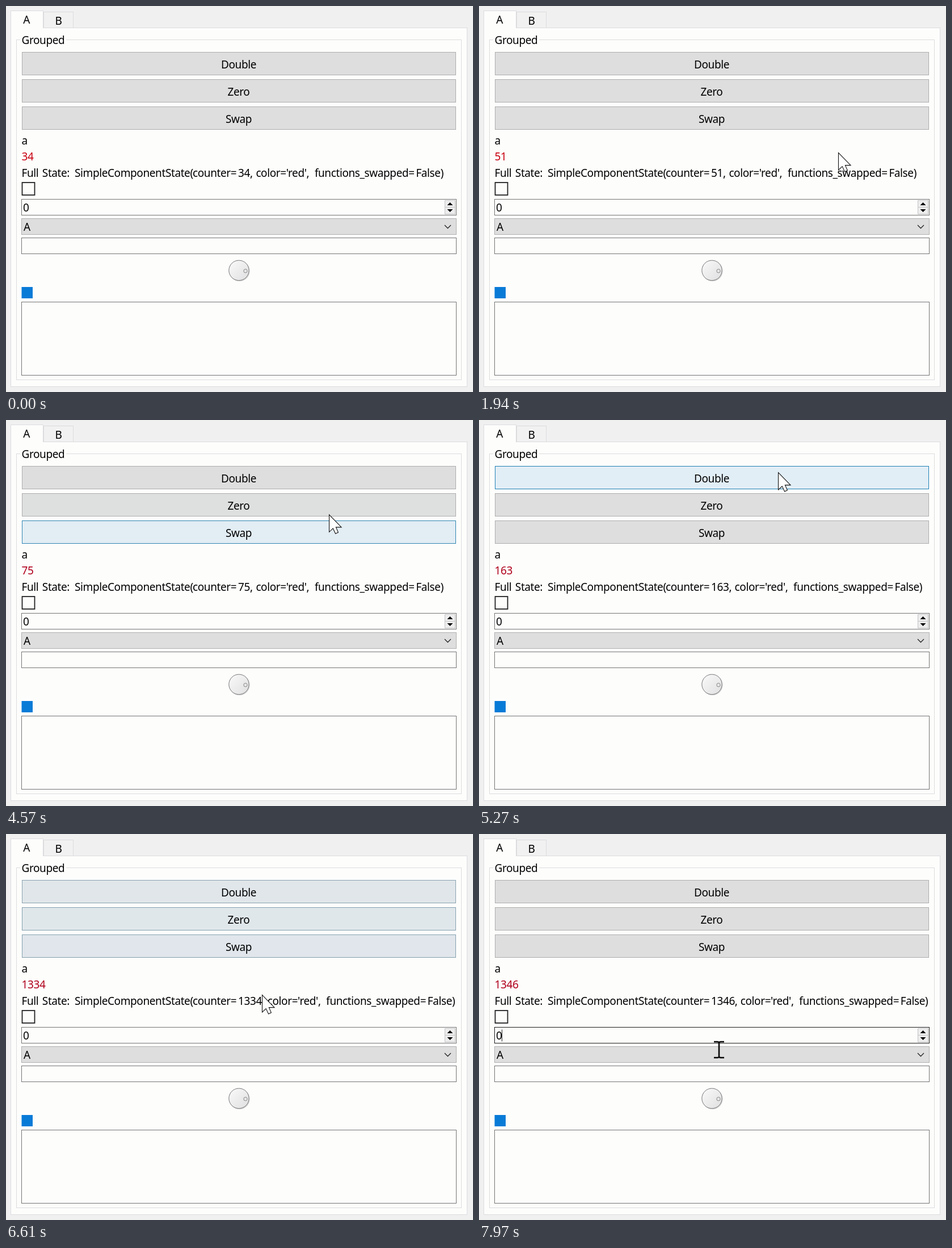
These frames come from a looping animation (823 px wide and 680 px high, 8 s). An HTML page:

```html
<!DOCTYPE html>
<html lang="en">
<head>
<meta charset="utf-8">
<title>Widget demo</title>
<style>
  html, body { margin: 0; width: 100%; height: 100%; overflow: hidden; background: #f0f0f1; }
  svg { display: block; width: 100%; height: 100%; }
  text {
    font: 19px "Noto Sans", "Open Sans", sans-serif;
    letter-spacing: -.4px; word-spacing: 2px; white-space: pre;
  }
  .mid { text-anchor: middle; }
  .pane { fill: #fdfdfc; stroke: #dcdcdf; }
  .tab { fill: #f1f1f1; stroke: #dcdcdf; }
  .field { fill: #fdfdfc; stroke: #747474; }
  .combo { fill: #dedede; stroke: #b0b0b0; }
  .step { fill: #ededed; stroke: #c4c4c4; }
  .ink { fill: none; stroke: #222; }
</style>
</head>
<body>
<svg viewBox="0 0 823 680" preserveAspectRatio="none">
  <defs>
    <linearGradient id="knob" x1="0" y1="0" x2="1" y2="1">
      <stop offset="0" stop-color="#fafafa"/>
      <stop offset="1" stop-color="#dfdfe1"/>
    </linearGradient>
  </defs>

  <rect class="pane" x="8.5" y="38.5" width="804" height="632"/>
  <rect class="tab" x="66.5" y="10.5" width="52" height="28"/>
  <path class="pane" d="M8.5 39V8.5H65.5V39"/>
  <rect x="9" y="37" width="56" height="4" fill="#fdfdfc"/>
  <text class="mid" x="36" y="31">A</text>
  <text class="mid" x="92.5" y="33">B</text>

  <rect class="pane" x="18.5" y="59.5" width="784" height="599"/>
  <rect x="25" y="57" width="81" height="5" fill="#fdfdfc"/>
  <text x="27.5" y="67">Grouped</text>

  <g id="buttons"></g>

  <text x="27.5" y="244">a</text>
  <text id="count" x="27.5" y="272"></text>
  <g id="state"></g>

  <rect class="ink" x="28.5" y="311" width="22" height="22" stroke-width="1.8"/>

  <rect id="spin" class="field" x="27.5" y="340.5" width="766" height="28"/>
  <rect class="step" x="773.5" y="342.5" width="18" height="12"/>
  <rect class="step" x="773.5" y="354.5" width="18" height="12"/>
  <path d="M777.5 351l5-5 5 5zM777.5 358l5 5 5-5z"/>
  <text x="30" y="362">0</text>
  <path id="caret" class="ink" d="M40.5 344.5v21"/>

  <rect class="combo" x="27.5" y="374.5" width="766" height="28"/>
  <text x="31" y="396">A</text>
  <path class="ink" d="M773 386l5.5 5.5 5.5-5.5" stroke-width="1.3"/>

  <rect class="field" x="27.5" y="408.5" width="766" height="28"/>
  <circle cx="411.5" cy="467" r="18" fill="#d4d4d4"/>
  <circle cx="410.5" cy="465.8" r="17.7" fill="url(#knob)" stroke="#777"/>
  <circle cx="422" cy="466.8" r="3.2" fill="#e6e6e6" stroke="#888"/>
  <rect x="27.5" y="495" width="19.5" height="20" fill="#087bd7"/>
  <rect class="field" x="27.5" y="521.5" width="766" height="129"/>

  <g id="pointer">
    <path id="arrow" d="M.5 .5V31L7.2 24.6L11.6 34L16.4 31.8L12.4 22.6H22Z"
          fill="#fff" stroke="#111" stroke-width="1.1"/>
    <path id="beam" d="M-9-14h6q3 0 3 2.5q0-2.5 3-2.5h6M0-12V12M-9 14h6q3 0 3-2.5q0 2.5 3 2.5h6"
          fill="none" stroke="#080808" stroke-width="2.6"/>
  </g>
</svg>

<script>
const LOOP = 8000;
const TICK = 110;
const DIGIT = 10.2;
const CLICKS = [5210, 5450, 5705, 5945];
const SPIN_ENTER = 6800;
const SPIN_CLICK = 7500;
const BLINK = 530;

// time, x, y of the pointer tip
const PATH = [
  [350, 826, 610], [900, 717, 350], [1450, 633, 258], [2750, 633, 258],
  [3150, 621, 258], [4250, 621, 258], [4850, 527, 92], [6320, 527, 92],
  [6610, 451, 283], [6900, 425, 355], [7720, 423, 355], [7930, 423, 380]
];

// button index, pointer enters, pointer leaves
const HOVERS = [
  [2, 4465, 4542], [1, 4568, 4630], [0, 4655, 6385],
  [1, 6400, 6450], [2, 6458, 6500]
];

// words of the state line; those after the number move with its digits
const BEFORE = [[27.5, 'Full State:'], [121, 'SimpleComponentState('], [329, 'counter=']];
const NUMBER_X = 409;
const AFTER = [[11, "color='red',"], [114.5, 'functions_swapped='], [293, 'False)']];

const $ = id => document.getElementById(id);
const clamp = v => Math.max(0, Math.min(1, v));
const mix = (a, b, k) => a.map((v, i) => v + (b[i] - v) * k);
const rgb = c => `rgb(${c.map(Math.round)})`;
const show = (el, on) => { el.style.display = on ? '' : 'none'; };

function add(parent, tag, attrs, text = '') {
  const el = document.createElementNS(parent.namespaceURI, tag);
  for (const name in attrs) el.setAttribute(name, attrs[name]);
  el.textContent = text;
  parent.append(el);
  return el;
}

const buttons = ['Double', 'Zero', 'Swap'].map((label, i) => {
  const y = 81.5 + 48 * i;
  const box = add($('buttons'), 'rect', { x: 28.5, y, width: 764, height: 40 });
  add($('buttons'), 'text', { x: 410, y: y + 28.5, class: 'mid' }, label);
  return box;
});

const word = ([x, text]) => add($('state'), 'text', { x, y: 301 }, text);
BEFORE.forEach(word);
const number = word([NUMBER_X, '']);
const tail = AFTER.map(word);

function counterAt(t) {
  const ticks = time => Math.floor(time / TICK + 0.18);
  let value = 34, last = 0;
  for (const click of CLICKS.filter(c => c <= t)) {
    value = (value + ticks(click) - last) * 2;
    last = ticks(click);
  }
  return value + ticks(t) - last;
}

function pointerAt(t) {
  const next = PATH.findIndex(p => p[0] > t);
  if (next < 0) return PATH[PATH.length - 1].slice(1);
  const [t0, ...from] = PATH[next - 1];
  const [t1, ...to] = PATH[next];
  const k = (t - t0) / (t1 - t0);
  return mix(from, to, k * k * (3 - 2 * k));
}

function hoverAt(index, t) {
  const levels = HOVERS.filter(h => h[0] === index && t >= h[1]).map(([, enter, leave]) =>
    clamp((Math.min(t, leave) - enter) / 60) * clamp(1 - (t - leave) / 450));
  return Math.max(0, ...levels);
}

function pressAt(t) {
  return Math.max(...CLICKS.map(c => t < c ? clamp((t - c + 100) / 30) : clamp(1 - (t - c) / 25)));
}

function render(t) {
  const n = counterAt(t);
  const end = NUMBER_X + String(n).length * DIGIT;
  $('count').textContent = n;
  $('count').style.fill = t < 2520 ? '#c90010' : '#b0001c';
  number.textContent = `${n},`;
  tail.forEach((el, i) => el.setAttribute('x', end + AFTER[i][0]));

  buttons.forEach((box, i) => {
    const hover = hoverAt(i, t);
    const press = i === 0 ? pressAt(t) : 0;
    const fill = mix([222, 222, 222], [226, 238, 246], hover);
    const edge = mix([173, 173, 173], [30, 128, 180], hover * hover);
    box.style.fill = rgb(mix(fill, [204, 228, 247], press));
    box.style.stroke = rgb(mix(edge, [0, 84, 153], press));
  });

  const inSpin = t >= SPIN_ENTER;
  $('spin').style.stroke = inSpin ? '#1c1c1c' : '';
  show($('caret'), t >= SPIN_CLICK && Math.floor((t - SPIN_CLICK) / BLINK) % 2 === 0);

  const visible = t >= PATH[0][0];
  show($('pointer'), visible);
  show($('arrow'), !inSpin);
  show($('beam'), inSpin);
  if (visible) $('pointer').setAttribute('transform', `translate(${pointerAt(t)})`);
}

const start = performance.now();
function frame() {
  render((performance.now() - start) % LOOP);
  requestAnimationFrame(frame);
}
frame();
</script>
</body>
</html>
```
